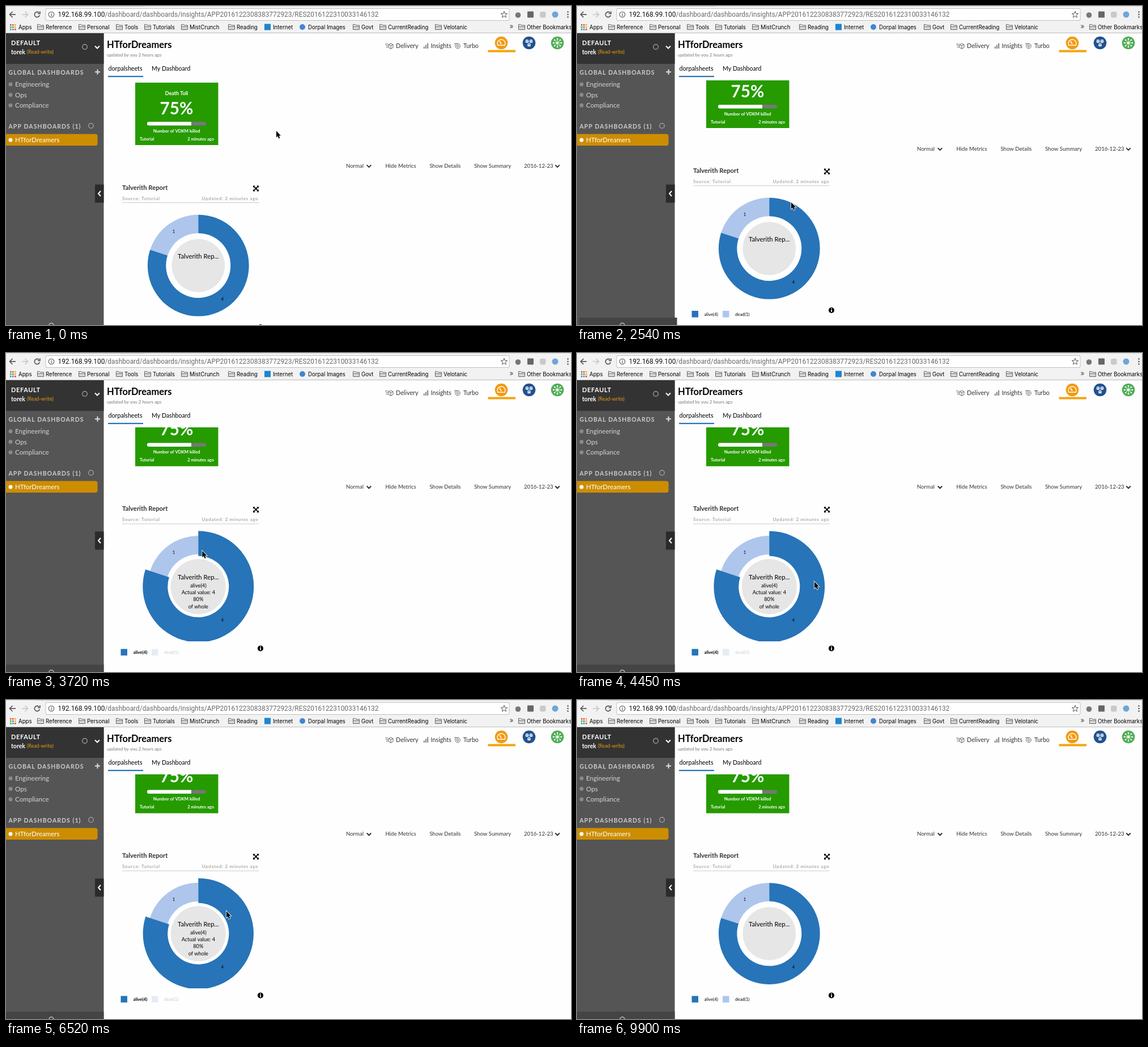
An HTML page with a canvas that plays this animation: 997 px wide and 562 px high, repeating every 10000 ms.

```html
<!DOCTYPE html>
<html lang="en">
<head>
<meta charset="utf-8">
<title>Dashboard</title>
<style>
html, body { margin: 0; width: 100%; height: 100%; overflow: hidden; background: #fefefe; }
canvas { display: block; width: 997px; height: 562px; }
</style>
</head>
<body>
<canvas id="stage" width="997" height="562"></canvas>
<script>
const ctx = document.getElementById('stage').getContext('2d');
const LOOP = 10000, STEP = 148.2, TAU = Math.PI * 2;
const LATO = 'Lato, sans-serif', URL_FONT = 'Roboto, sans-serif', UI = 'Inter, sans-serif';
const BLUE = '#2774b8', PALE = '#aec6ec', INK = '#333';

// [time, x, y] of the pointer tip
const POINTER = [
  [0, 477, 220], [600, 422, 256], [1190, 356, 222], [1480, 330, 205], [1780, 342, 223],
  [1930, 342, 223], [2075, 360, 290], [2220, 378, 346], [3580, 378, 346], [3880, 302, 352],
  [4150, 372, 366], [4446, 419, 403], [4900, 419, 403], [5040, 302, 352], [5480, 295, 352],
  [5780, 295, 352], [6220, 345, 342], [6521, 389, 372], [7110, 402, 384], [7410, 402, 384],
  [7700, 500, 388], [8151, 627, 393], [8440, 656, 402], [9040, 832, 526]
];
const POINTER_END = 9170;
// [time, hovered slice]
const HOVER = [[2690, 0], [3870, 1], [4100, 0], [5040, 1], [6220, 0], [7560, -1]];
const PULSES = [20, 1500, 2980, 4460, 5930, 6850, 7450, 8880];

function text(str, x, y, size, color, opt = {}) {
  ctx.font = `${opt.weight || 400} ${size}px ${opt.font || LATO}`;
  ctx.letterSpacing = (opt.space || 0) + 'px';
  ctx.textAlign = opt.align || 'left';
  ctx.fillStyle = color;
  ctx.fillText(str, x, y);
}
function rect(x, y, w, h, color, radius = 0) {
  ctx.fillStyle = color;
  ctx.beginPath();
  ctx.roundRect(x, y, w, h, radius);
  ctx.fill();
}
function disc(x, y, r, color) {
  ctx.fillStyle = color;
  ctx.beginPath();
  ctx.arc(x, y, r, 0, TAU);
  ctx.fill();
}
function ring(x, y, r, color, width = 1) {
  ctx.strokeStyle = color;
  ctx.lineWidth = width;
  ctx.beginPath();
  ctx.arc(x, y, r, 0, TAU);
  ctx.stroke();
}
function line(points, color, width = 1) {
  ctx.strokeStyle = color;
  ctx.lineWidth = width;
  ctx.beginPath();
  for (let i = 0; i < points.length; i += 2) ctx.lineTo(points[i], points[i + 1]);
  ctx.stroke();
}
const chevron = (x, y, color, s = 4) => line([x - s, y - s / 2, x, y + s / 2, x + s, y - s / 2], color, 2);

function pointerAt(t) {
  const i = POINTER.findIndex(p => p[0] > t);
  if (i < 0) return POINTER[POINTER.length - 1].slice(1);
  const [t0, x0, y0] = POINTER[i - 1], [t1, x1, y1] = POINTER[i];
  const k = (t - t0) / (t1 - t0);
  return [x0 + (x1 - x0) * k, y0 + (y1 - y0) * k];
}
function popOf(slice, t) {
  let v = 0;
  HOVER.forEach(([start, who], i) => {
    if (t < start) return;
    const end = Math.min(t, i + 1 < HOVER.length ? HOVER[i + 1][0] : LOOP);
    const p = Math.min(1, (end - start) / 450);
    v += ((who === slice ? 1 : 0) - v) * (1 - (1 - p) ** 3);
  });
  return v;
}
function hoveredAt(t) {
  const past = HOVER.filter(h => h[0] <= t);
  return past.length ? past[past.length - 1][1] : -1;
}

function spinner(x, y, t) {
  ring(x, y, 4.3, '#aaa', 1.2);
  const start = PULSES.find(s => t >= s && t < s + 290);
  if (start === undefined) return;
  const p = (t - start) / 290;
  ctx.globalAlpha = 0.8 * (1 - p);
  ring(x, y, 4.3 + 5 * Math.sqrt(p), '#bbb');
  ctx.globalAlpha = 1;
}

function sidebar(t) {
  rect(0, 46, 172.5, 520, '#555');
  rect(0, 46, 172.5, 56, INK);
  text('DEFAULT', 9, 69, 11, '#fff', { weight: 700, space: 0.65 });
  text('torek', 9, 85, 10.5, '#fff', { weight: 700 });
  text('(Read-write)', 37, 84, 8.8, '#e59a12');
  spinner(139, 72, t);
  chevron(161, 72.5, '#fff');
  const head = { weight: 700, space: 1.05 };
  text('GLOBAL DASHBOARDS', 4.5, 120.5, 10.5, '#ccc', head);
  rect(157, 115.2, 9, 2, '#ddd');
  rect(160.5, 111.7, 2, 9, '#ddd');
  ['Engineering', 'Ops', 'Compliance'].forEach((name, i) => {
    const y = 138 + i * 18.5;
    disc(8, y, 3.5, '#8a8a8a');
    text(name, 16, y + 4, 11.6, '#d4d4d4');
  });
  text('APP DASHBOARDS (1)', 4.5, 216, 10.5, '#ccc', head);
  spinner(150, 211, t);
  rect(0, 225.5, 161.5, 20.5, '#cd8d00', [0, 4, 4, 0]);
  disc(8, 236, 3.5, '#fff');
  text('HTforDreamers', 16, 240, 11.5, '#fff');
  if (t >= 2540) rect(t < 2690 ? 4 : 0, 549, 172.5, 15, '#444');
  ring(80, 562.5, 4, '#bbb', 1.5);
  rect(157, 314.5, 15.5, 32, '#2b2b2b');
  line([167, 326, 163, 330.5, 167, 335], '#fff', 2);
}

function headerIcons() {
  const c = '#666';
  line([669, 67, 674, 67], c);
  line([670, 70, 674, 70], c);
  line([671, 73, 674, 73], c);
  line([675, 68, 679, 66, 683, 68, 683, 73, 679, 75.5, 675, 73, 675, 68, 679, 70, 683, 68], c);
  line([679, 70, 679, 75], c);
  [3.5, 6.5, 9.5].forEach((h, i) => rect(737 + i * 3.2, 75 - h, 1.6, h, c));
  ring(797, 70.5, 4.3, c);
  ring(797, 70.5, 1.8, c);
  line([791, 66.5, 798, 66.5], c);

  disc(874, 65, 11.3, '#f39a11');
  ctx.strokeStyle = '#fff';
  ctx.lineWidth = 1.4;
  ctx.beginPath();
  ctx.arc(874, 66, 7, Math.PI * 0.85, Math.PI * 2.15);
  ctx.closePath();
  ctx.stroke();
  line([874, 67, 871, 62], '#fff', 1.6);
  rect(850.5, 77.5, 48.5, 4, '#f2a50f');

  disc(923, 65, 11.3, '#21518f');
  [[919.5, 62], [926.5, 62], [923, 68.5]].forEach(([x, y]) => {
    rect(x - 2.8, y - 2.8, 5.6, 5.6, '#e4ecf6', 1.5);
    line([x - 2, y - 1, x, y, x + 2, y - 1], '#21518f', 0.8);
  });

  disc(973, 65, 11.3, '#4fae55');
  for (let i = 0; i < 8; i++) {
    const a = i * TAU / 8, x = 973 + 7 * Math.cos(a), y = 65 + 7 * Math.sin(a);
    line([973, 65, x, y], '#fff', 0.9);
    disc(x, y, 1.3, '#fff');
  }
  disc(973, 65, 2, '#fff');
}

function header() {
  text('HTforDreamers', 178, 74, 16.5, '#000', { weight: 700 });
  text('updated by you 2 hours ago', 178, 88.5, 7.9, '#777');
  text('Delivery', 688, 74, 10.8, INK);
  text('Insights', 749.5, 74, 10.8, INK);
  text('Turbo', 807, 74, 10.6, INK);
  headerIcons();
  text('dorpalsheets', 180.5, 114, 10.7, '#000');
  text('My Dashboard', 257, 114, 10.6, '#000');
  rect(180, 123, 62, 2.2, BLUE);
}

function card() {
  const mid = { align: 'center', weight: 700 };
  rect(228, 135, 146.5, 110, '#259b00');
  text('Death Toll', 301, 157, 9, '#fff', mid);
  text('75%', 301, 191, 29.7, '#fff', mid);
  rect(249, 204, 104, 6.5, '#777', 3);
  rect(249, 204, 78, 6.5, '#fff', [3, 0, 0, 3]);
  text('Number of VDKM killed', 301, 223, 7.7, '#fff', mid);
  text('Tutorial', 236, 236.5, 7.5, '#fff', { weight: 700 });
  text('2 minutes ago', 367, 236.5, 7.5, '#fff', { weight: 700, align: 'right' });
}

function menu() {
  const items = [['Normal', 600], ['Hide Metrics', 669.5], ['Show Details', 747.5],
    ['Show Summary', 826], ['2016-12-23', 914]];
  items.forEach(([name, x]) => text(name, x, 284.5, 9.6, INK));
  chevron(640.5, 282, INK, 3.8);
  chevron(973, 282, INK, 3.8);
}

function expandIcon(x, y) {
  line([x - 3, y - 3, x + 3, y + 3], '#000', 1.8);
  line([x + 3, y - 3, x - 3, y + 3], '#000', 1.8);
  for (const sx of [-1, 1]) for (const sy of [-1, 1]) {
    ctx.fillStyle = '#000';
    ctx.beginPath();
    ctx.moveTo(x + sx * 5, y + sy * 5);
    ctx.lineTo(x + sx * 5, y + sy * 1.2);
    ctx.lineTo(x + sx * 1.2, y + sy * 5);
    ctx.fill();
  }
}

function slice(x, y, from, to, pop, color) {
  const a = from * TAU - TAU / 4, b = to * TAU - TAU / 4;
  ctx.fillStyle = color;
  ctx.beginPath();
  ctx.arc(x, y, 89.4 + 8.6 * pop, a, b);
  ctx.arc(x, y, 57 - 3 * pop, b, a, true);
  ctx.fill();
}

function chart(t) {
  const x = 339.3, y = 457.2, mid = { align: 'center' };
  const pops = [popOf(0, t), popOf(1, t)], on = hoveredAt(t);
  ctx.save();
  ctx.beginPath();
  ctx.rect(200, y - 100, 250, 196.5);
  ctx.clip();
  slice(x, y, 0.8, 1, pops[1], PALE);
  slice(x, y, 0, 0.8, pops[0], BLUE);
  ctx.restore();
  disc(x, y, 46.8 + 1.8 * Math.max(...pops), '#e6e6e6');
  text('1', 296, 400, 7.6, '#000', mid);
  text('4', 382, 518.5, 7.6, '#000', mid);
  text('Talverith Rep...', x, 445, 11.3, '#000', mid);

  const parts = [['alive', 4, BLUE, 202.5, '#e4ecf4'], ['dead', 1, PALE, 257, '#e6ecf5']];
  if (on >= 0) {
    const [name, n] = parts[on];
    [`${name}(${n})`, `Actual value: ${n}`, `${n * 20}%`, 'of whole']
      .forEach((s, i) => text(s, x, 458.8 + i * 12.1, 9.2, '#000', mid));
  }
  parts.forEach(([name, n, color, left, faint], i) => {
    const dim = on >= 0 && on !== i;
    rect(left, 567, 11.5, 11.5, dim ? faint : color);
    text(`${name}(${n})`, left + 22, 575.5, 7.8, dim ? '#ccc' : '#000', { weight: on === i ? 700 : 400 });
  });
}

function report(t) {
  text('Talverith Report', 205, 324, 11.3, INK, { weight: 700 });
  expandIcon(441, 321.5);
  const small = { weight: 700, space: 0.7 };
  text('Source: Tutorial', 205, 342, 8, '#a8a8a8', small);
  text('Updated: 2 minutes ago', 345.5, 342, 8, '#a8a8a8', small);
  rect(205, 346, 241, 1, '#ccc');
  chart(t);
  disc(449, 566, 5, '#000');
  rect(448.2, 565, 1.8, 4, '#fff');
  rect(448.2, 562.6, 1.8, 1.5, '#fff');
}

function star(x, y, r, color) {
  const pts = [];
  for (let i = 0; i <= 10; i++) {
    const a = i * TAU / 10 - TAU / 4, d = i % 2 ? r * 0.42 : r;
    pts.push(x + d * Math.cos(a), y + d * Math.sin(a));
  }
  line(pts, color, 1);
}

function folder(x) {
  rect(x, 34.5, 11, 7, '#d6d6d6');
  line([x, 41.5, x, 32.5, x + 4, 32.5, x + 5.5, 34, x + 11, 34, x + 11, 41.5, x, 41.5], '#666');
  line([x, 36.3, x + 11, 36.3], '#666', 0.8);
}

function browser() {
  rect(0, 0, 997, 48, '#f2f2f2');
  rect(0, 0, 997, 1, '#dcdcdc');
  rect(54, 0, 190, 1, '#c4c4c4');
  rect(0, 47, 997, 1, '#bcbcbc');
  line([11.5, 10, 6.5, 15, 11.5, 20], '#555', 1.7);
  line([6.5, 15, 17, 15], '#555', 1.7);
  line([33.5, 10, 38.5, 15, 33.5, 20], '#c8c8c8', 1.7);
  line([28, 15, 38.5, 15], '#c8c8c8', 1.7);
  ctx.strokeStyle = '#555';
  ctx.lineWidth = 1.7;
  ctx.beginPath();
  ctx.arc(55, 15, 4.6, 0.3, TAU - 0.8);
  ctx.stroke();
  line([60, 9.5, 60, 13.3, 56, 13.3], '#555', 1.7);

  rect(69.5, 4, 819, 22, '#c0c0c0', 3);
  rect(70.5, 5, 817, 20, '#fff', 2);
  ring(80, 15, 4.8, '#555', 1.1);
  rect(79.4, 14.2, 1.3, 3.6, '#555');
  rect(79.4, 12, 1.3, 1.3, '#555');
  const host = '192.168.99.100';
  text(host, 91.5, 19.3, 11.9, '#111', { font: URL_FONT });
  const w = ctx.measureText(host).width;
  text('/dashboard/dashboards/insights/APP2016122308383772923/RES2016122310033146132',
    91.5 + w, 19.3, 11.9, '#6a6a6a', { font: URL_FONT });
  star(879, 15.3, 6, '#555');
  disc(903.5, 16, 4.8, '#777');
  rect(920, 9.5, 11, 11, '#666', 1);
  rect(942, 10, 10.5, 10.5, '#c9c9c9', 3);
  disc(969, 15, 5.5, '#6ea5d8');
  [10.5, 15, 19.5].forEach(y => disc(991.5, y, 1.3, '#555'));

  const dots = ['#e04a3f', '#e04a3f', '#f0b400', '#3aa757', '#4285d4', '#f0b400', '#3aa757', '#4285d4', '#e04a3f'];
  dots.forEach((c, i) => rect(7 + i % 3 * 4, 32 + Math.floor(i / 3) * 4, 2.6, 2.6, c));
  const marks = [['Apps', 22], ['Reference', 70, 1], ['Personal', 143, 1], ['Tools', 209, 1],
    ['Tutorials', 259, 1], ['MistCrunch', 324, 1], ['Reading', 407, 1], ['Internet', 471],
    ['Dorpal Images', 533], ['Govt', 627, 1], ['CurrentReading', 674, 1], ['Velotanic', 772, 1],
    ['Other Bookmarks', 919, 1]];
  marks.forEach(([name, x, isFolder]) => {
    if (isFolder) folder(x - 14.5);
    text(name, x, 40.5, 9.65, '#000', { font: UI });
  });
  rect(456, 31.5, 11, 11, '#1c86d1');
  disc(523, 37, 5, '#4285d4');
  text('»', 888.5, 40, 12, '#444', { font: UI });
}

function pointer(x, y) {
  const shape = [0, 0, 0, 11.5, 2.6, 9.2, 4.4, 13.4, 6.3, 12.6, 4.6, 8.6, 8, 8.4];
  ctx.beginPath();
  for (let i = 0; i < shape.length; i += 2) ctx.lineTo(x + shape[i], y + shape[i + 1]);
  ctx.closePath();
  ctx.lineWidth = 1.6;
  ctx.strokeStyle = '#fff';
  ctx.stroke();
  ctx.fillStyle = '#000';
  ctx.fill();
}

function draw(t) {
  const held = Math.floor((t + 20) / STEP) * STEP;
  const scroll = t < 2540 ? 0 : t < 2690 ? 30 : 45.6;
  const nudge = t >= 2840 && t < 3420 ? -1 : 0;
  rect(0, 0, 997, 562, '#fefefe');
  ctx.save();
  ctx.translate(0, nudge);
  sidebar(t);
  header();
  ctx.beginPath();
  ctx.rect(173, 131, 824, 440);
  ctx.clip();
  ctx.translate(0, -scroll);
  card();
  menu();
  report(t);
  ctx.restore();
  browser();
  if (t < POINTER_END) pointer(...pointerAt(held));
}

function tick() {
  draw(performance.now() % LOOP);
  requestAnimationFrame(tick);
}
tick();
</script>
</body>
</html>
```
